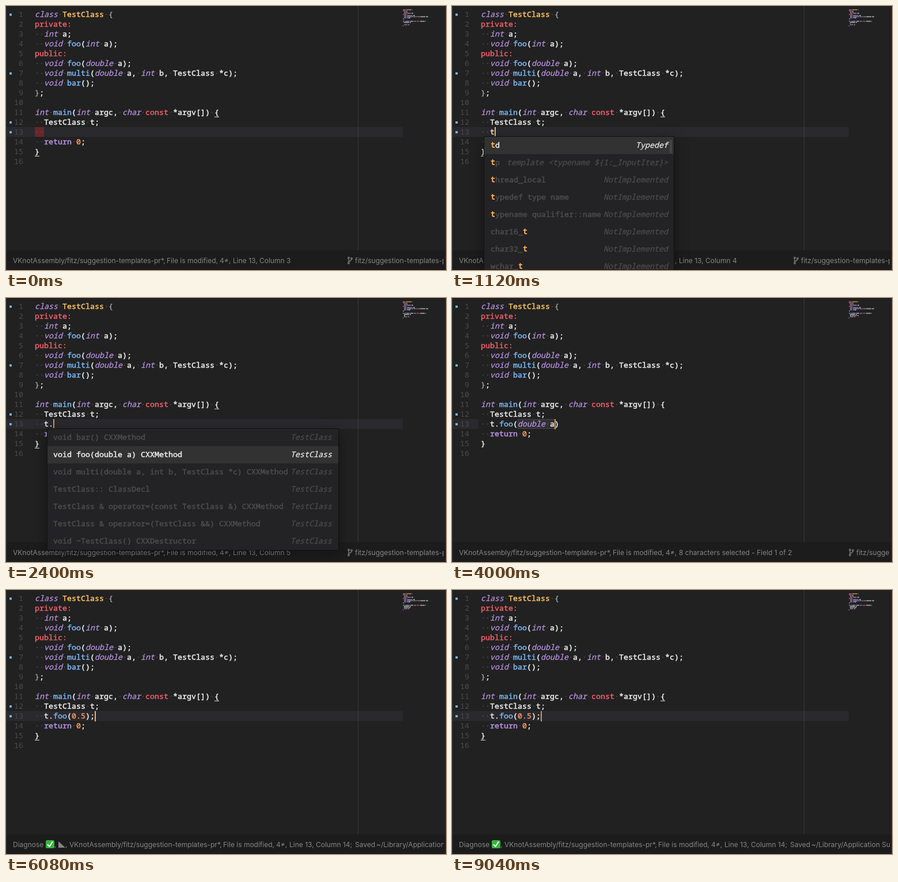
These frames come from a looping animation (764 px wide and 458 px high, 9.12 s). An HTML page with a canvas:

```html
<!DOCTYPE html>
<html lang="en">
<head>
<meta charset="utf-8">
<title>Code completion</title>
<style>
html, body { margin: 0; width: 100%; height: 100%; overflow: hidden; background: #212121; }
canvas { display: block; }
</style>
</head>
<body>
<canvas id="stage" width="764" height="458"></canvas>
<script>
const ctx = document.getElementById('stage').getContext('2d');
const LOOP = 9120, W = 764, H = 458;
const LEFT = 50, CHAR = 8, ROW = 17, EDIT_ROW = 12, BAR_Y = 424;
const MONO = '13.333px "Noto Sans Mono", "DejaVu Sans Mono", monospace';
const UI = '12px Inter, "Open Sans", sans-serif';
const C = {
  bg: '#212121', bar: '#1c1c1c', line: '#2a292d', text: '#ececec', dim: '#4c4c4d',
  dot: '#555555', grey: '#9a9a9a', type: '#b992e2', word: '#b992e2', red: '#ee5d68',
  func: '#7ab5f2', num: '#f3935f', name: '#fac062', caret: '#ffb454', ui: '#858585'
};
const PROJECT = 'VKnotAssembly/fitz/suggestion-templates-pr*,';
const BRANCH = 'fitz/suggestion-templates-pr';

const code = [
  'class TestClass {', 'private:', '  int a;', '  void foo(int a);', 'public:',
  '  void foo(double a);', '  void multi(double a, int b, TestClass *c);', '  void bar();',
  '};', '', 'int main(int argc, char const *argv[]) {', '  TestClass t;', '',
  '  return 0;', '}', ''
];

// time of the key press, edited line, caret column
const edits = [
  [-1000, '  ', 2], [880, '  t', 3], [1680, '  t.', 4],
  [3280, '  t.foo(double a)', 16],
  [4400, '  t.foo(0)', 9], [4560, '  t.foo(0.)', 10], [4720, '  t.foo(0.5)', 11],
  [5120, '  t.foo(0.5)', 12], [5440, '  t.foo(0.5);', 13]
];

const words = [
  ['td', 'Typedef'], ['tp', 'template <typename ${1:_InputIter}>'],
  ['thread_local'], ['typedef type name'], ['typename qualifier::name'],
  ['char16_t'], ['char32_t'], ['wchar_t']
].map(([a, b]) => [a, b || 'NotImplemented']);

const members = [
  'void bar() CXXMethod', 'void foo(double a) CXXMethod',
  'void multi(double a, int b, TestClass *c) CXXMethod', 'TestClass:: ClassDecl',
  'TestClass & operator=(const TestClass &) CXXMethod',
  'TestClass & operator=(TestClass &&) CXXMethod', 'void ~TestClass() CXXDestructor'
].map(s => [s, 'TestClass']);

const TOKEN = new RegExp([
  '(?<type>\\b(?:class|int|void|double|char)\\b)', '(?<word>\\breturn\\b)',
  '(?<red>private:|public:|\\bconst\\b)', '(?<func>\\b(?:foo|multi|bar|main)(?=\\())',
  '(?<name>(?<=class )\\w+)', '(?<grey>^\\}(?=;)|(?<=^class \\w+ )\\{)',
  '(?<num>\\d[\\d.]*)', '(?<dot> )', '(?<text>\\w+|[^\\w ])'
].join('|'), 'g');

function tokens(line) {
  return [...line.matchAll(TOKEN)].map(m => ({
    col: m.index, str: m[0], kind: Object.keys(m.groups).find(k => m.groups[k])
  }));
}

function rect(x, y, w, h, color) {
  ctx.fillStyle = color;
  ctx.fillRect(x, y, w, h);
}

function round(x, y, w, h, r, color) {
  ctx.fillStyle = color;
  ctx.beginPath();
  ctx.roundRect(x, y, w, h, r);
  ctx.fill();
}

function label(str, x, y, color, font, align = 'left', bold = 0) {
  ctx.font = font;
  ctx.fillStyle = ctx.strokeStyle = color;
  ctx.textAlign = align;
  ctx.fillText(str, x, y);
  if (bold) {
    ctx.lineWidth = bold;
    ctx.lineJoin = 'round';
    ctx.strokeText(str, x, y);
  }
}

const upright = (str, x, y, color) => label(str, x, y, color, MONO, 'left', 0.5);
const slanted = (str, x, y, color, align) =>
  label(str, x, y, color, 'italic ' + MONO, align, 0.25);

const rowMid = i => 14 + ROW * i;
const colX = col => LEFT + CHAR * col;
const underline = (col, row) => rect(colX(col), rowMid(row) + 8, CHAR, 1, '#d8d8d8');

function drawLine(line, row) {
  const mid = rowMid(row);
  for (const { col, str, kind } of tokens(line)) {
    if (kind === 'dot') rect(colX(col) + 3.2, mid - 0.2, 1.6, 1.6, C.dot);
    else (kind === 'type' ? slanted : upright)(str, colX(col), mid + 5, C[kind]);
  }
}

function drawMap(lines) {
  ctx.globalAlpha = 0.7;
  lines.forEach((line, i) => {
    for (const { col, str, kind } of tokens(line)) {
      if (kind !== 'dot') rect(689 + col, 5.8 + 2 * i, str.length, 1.5, C[kind]);
    }
  });
  ctx.globalAlpha = 1;
}

function drawEditor(lines, col) {
  const top = rowMid(EDIT_ROW) - 8, edited = lines[EDIT_ROW], selecting = col === 16;
  rect(0, top, selecting ? 46 : 689, ROW, C.line);
  for (let y = 0; y < BAR_Y; y += 2) rect(611, y, 1, 1, '#505050');

  if (selecting) {
    round(114, top, 65, 17, 3, '#48484b');
    round(115, top + 1, 63, 15, 2, '#303033');
  }
  if (edited === '  ') rect(LEFT, top, 16, ROW, '#68262b');

  lines.forEach((line, i) => {
    label(i + 1, 30, rowMid(i) + 5, '#4b4b4b', MONO, 'right');
    drawLine(line, i);
  });
  for (const i of [0, 6, 11, 12]) rect(6, rowMid(i) - 1, 4, 4, '#70aee9');

  if (col >= 9 && col <= 12) {
    underline(7, EDIT_ROW);
    underline(edited.indexOf(')'), EDIT_ROW);
  } else if (!selecting) {
    underline(39, 10);
    underline(0, 14);
  }
  drawMap(lines);
}

// solid after a key press, then a soft dip once per period
function drawCaret(col, age) {
  const p = (age - 600) % 960;
  ctx.globalAlpha = age < 600 || p > 800 ? 1 : 0.5 + 0.5 * Math.cos(p / 400 * Math.PI);
  rect(colX(col), rowMid(EDIT_ROW) - 8, 2, 18, C.caret);
  ctx.globalAlpha = 1;
}

function drawBranch(x) {
  ctx.strokeStyle = C.ui;
  ctx.lineWidth = 1.2;
  ctx.beginPath();
  ctx.moveTo(x + 2, 438);
  ctx.lineTo(x + 2, 445);
  ctx.moveTo(x + 7, 439);
  ctx.quadraticCurveTo(x + 7, 442, x + 2, 443);
  for (const [dx, y] of [[2, 437], [2, 446], [7, 438]]) {
    ctx.moveTo(x + dx + 1.3, y);
    ctx.arc(x + dx, y, 1.3, 0, 7);
  }
  ctx.stroke();
  label(BRANCH, x + 13, 446, C.ui, UI);
}

function drawCheck() {
  round(69, 434, 15, 14, 2.5, '#35b53f');
  ctx.strokeStyle = '#ffffff';
  ctx.lineWidth = 2;
  ctx.beginPath();
  ctx.moveTo(72, 441.5);
  ctx.lineTo(75.5, 445);
  ctx.lineTo(81, 436.5);
  ctx.stroke();
}

// a square's half, missing one corner after another
function drawSpinner(step) {
  const corners = [[91, 447], [91, 436], [103, 436], [103, 447]];
  ctx.fillStyle = C.ui;
  ctx.beginPath();
  corners.forEach((c, i) => { if (i !== step % 4) ctx.lineTo(...c); });
  ctx.fill();
}

function drawStatus(t, col) {
  rect(0, BAR_Y, W, H - BAR_Y, C.bar);
  ctx.save();
  ctx.beginPath();
  ctx.rect(0, BAR_Y, 760, H - BAR_Y);
  ctx.clip();
  const put = (str, x) => label(str, x, 446, C.ui, UI);
  const saved = t >= 5760, checked = t >= 5900, busy = checked && t < 6500;
  let x = 12;
  if (checked) {
    put('Diagnose', 12);
    drawCheck();
    put(',', 84);
    x = 91;
    if (busy) {
      drawSpinner(1 + Math.floor((t - 5900) / 100));
      put(',', 103);
      x = 110;
    }
  }
  put(PROJECT, x);
  put('File is modified,', x + 267);
  put('4≠,', x + 359);
  let end = col < 9 ? 494 : 501;
  if (col === 16) {
    put('8 characters selected - Field 1 of 2', x + 382);
    end = 590;
  } else {
    put('Line 13,', x + 382);
    const field = col >= 9 && col < 12;
    put('Column ' + (col + 1) + (field ? ' - Field 1 of 2' : saved ? ';' : ''), x + 428);
    if (field) end = 584;
  }
  if (saved) {
    put('Saved', x + 496);
    put('~/Library/Application Support', x + 533);
  } else {
    drawBranch(end + 99);
  }
  ctx.restore();
}

function drawPopup(rows, x, w, pad, picked, match) {
  const top = 227, h = rows.length * 30, right = x + w - (match ? 11 : 12);
  ctx.save();
  ctx.shadowColor = 'rgba(0,0,0,0.4)';
  ctx.shadowBlur = 22;
  ctx.shadowOffsetY = 4;
  rect(x, top, w, h, '#232225');
  ctx.restore();
  ctx.strokeStyle = '#111112';
  ctx.lineWidth = 1;
  ctx.strokeRect(x + 0.5, top - 0.5, w - 1, h + 1);
  rows.forEach(([left, info], i) => {
    const y = top + 30 * i + 19, on = i === picked, color = on ? C.text : C.dim;
    if (on) rect(x + 1, top + 30 * i, w - 2, 30, '#323233');
    upright(left, x + pad, y, color);
    slanted(info, right, y, color, 'right');
    if (match) {
      const at = left[0] === match ? 0 : left.length - 1, mx = x + pad + at * CHAR;
      rect(mx, y - 12, CHAR, 15, on ? '#323233' : '#232225');
      label(match, mx, y, C.caret, 'bold ' + MONO);
    }
  });
  if (match) round(378, 232, 4, 24, 2, '#454547');
}

function draw(t) {
  const [at, line, col] = edits.filter(e => e[0] <= t).pop();
  const lines = code.slice();
  lines[EDIT_ROW] = line;
  rect(0, 0, W, H, C.bg);
  drawEditor(lines, col);
  drawCaret(col, t - at);
  drawStatus(t, col);
  rect(0, 0, 1, H, '#303030');
  rect(W - 1, 0, 1, H, '#303030');
  if (t >= 1040 && t < 1680) drawPopup(words, 55, 331, 12, 0, 't');
  if (t >= 1840 && t < 3280) drawPopup(members, 71, 507, 11, t < 2320 ? 0 : 1);
}

const start = performance.now();
function tick() {
  draw((performance.now() - start) % LOOP);
  requestAnimationFrame(tick);
}
tick();
</script>
</body>
</html>
```
